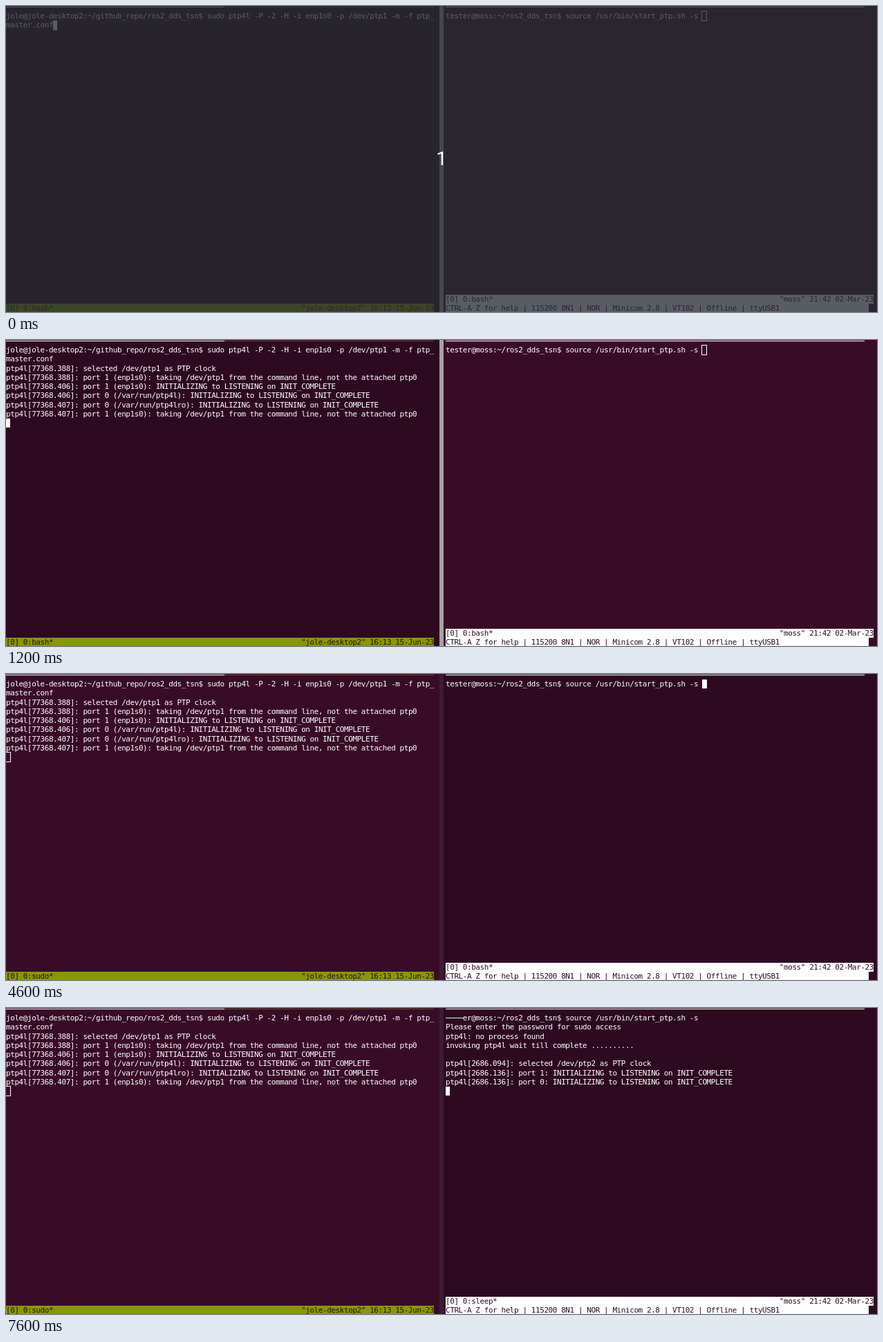
An HTML page that plays this animation: 1260x444 px, repeating every 8000 ms.

```html
<!DOCTYPE html>
<html lang="en">
<head>
<meta charset="utf-8">
<title>Clock sync in two terminals</title>
<style>
  html, body { margin: 0; width: 100%; height: 100%; overflow: hidden; background: #2d0a20; }
  #stage { position: relative; width: 1260px; height: 444px; overflow: hidden; }
  #stage div { position: absolute; box-sizing: border-box; }
  .pane { top: 0; height: 444px; background: #380c27; }
  .pane.active { background: #2d0a20; }
  #left { left: 0; width: 627px; }
  #right { left: 636px; width: 624px; }
  #divider { left: 627px; top: 0; width: 9px; height: 444px; background: #380c27; }
  #divider::before { content: ""; position: absolute; left: 0; width: 6px; height: 100%; background: #a8a0a3; }
  #divider.dark { background: #2d0a20; }
  #divider.dark::before { background: #3f1b36; }
  .text {
    font: 11px "DejaVu Sans Mono", "Noto Sans Mono", monospace;
    line-height: 13.25px; letter-spacing: -0.432px;
    font-variant-ligatures: none; white-space: pre; color: #fff;
  }
  .ink { color: #300a24; }
  .cursor { width: 8px; height: 15px; margin: -1px 0 0 -1px; border: 1px solid #fff; }
  .active .cursor { width: 6.19px; height: 13.25px; margin: 0; border: 0; background: #fff; }
  #fade { inset: 0; background: rgba(39, 45, 51, .77); }
  #count {
    left: 0; top: 206px; width: 1260px; text-align: center; color: #fff;
    font: 28px/32px Roboto, "Open Sans", sans-serif;
  }
</style>
</head>
<body>
<div id="stage">
  <div id="left" class="pane"></div>
  <div id="divider"></div>
  <div id="right" class="pane"></div>
  <div id="fade"></div>
  <div id="count">1</div>
</div>
<script>
const LOOP = 8000, CELL = 6.19, ROW = 13.25, TOP = 8;
const byId = id => document.getElementById(id);
const [left, right, divider, fade, count] = ["left", "right", "divider", "fade", "count"].map(byId);
const timed = [];

function during(el, from, to = LOOP) {
  timed.push({ el, from, to });
}

function add(pane, className, style) {
  const el = document.createElement("div");
  el.className = className;
  Object.assign(el.style, style);
  return pane.appendChild(el);
}

function bar(pane, x, y, width, height, background) {
  add(pane, "bar", { left: x + "px", top: y + "px", width: width + "px", height: height + "px", background });
}

function write(pane, row, col, text, from = 0, to = LOOP, className = "text") {
  const el = add(pane, className, { left: col * CELL + "px", top: TOP + row * ROW + "px" });
  el.textContent = text;
  during(el, from, to);
}

function ink(pane, row, col, text, from, to) {
  write(pane, row, col, text, from, to, "text ink");
}

function writeLines(pane, row, lines, from, to) {
  lines.forEach((line, i) => write(pane, row + i, 0, line, from, to));
}

// Rules left over from the line scrolled off the top
bar(left, 0, 1, 316, 1, "#fff");
bar(left, 316, 1, 303, 1, "#5f4a2a");
bar(right, 0, 1, 606, 1, "#fff");

// Left terminal
writeLines(left, 0, [
  "jole@jole-desktop2:~/github_repo/ros2_dds_tsn$ sudo ptp4l -P -2 -H -i enp1s0 -p /dev/ptp1 -m -f ptp_",
  "master.conf"
]);
writeLines(left, 2, [
  "ptp4l[77368.388]: selected /dev/ptp1 as PTP clock",
  "ptp4l[77368.388]: port 1 (enp1s0): taking /dev/ptp1 from the command line, not the attached ptp0",
  "ptp4l[77368.406]: port 1 (enp1s0): INITIALIZING to LISTENING on INIT_COMPLETE",
  "ptp4l[77368.406]: port 0 (/var/run/ptp4l): INITIALIZING to LISTENING on INIT_COMPLETE",
  "ptp4l[77368.407]: port 0 (/var/run/ptp4lro): INITIALIZING to LISTENING on INIT_COMPLETE",
  "ptp4l[77368.407]: port 1 (enp1s0): taking /dev/ptp1 from the command line, not the attached ptp0"
], 1200);
bar(left, 0, 432, 619, 12, "#869900");
ink(left, 32, 0, "[0] 0:bash*", 0, 2500);
ink(left, 32, 0, "[0] 0:sudo*", 2500);
ink(left, 32, 69, '"jole-desktop2" 16:13 15-Jun-23');

// Right terminal
const command = "er@moss:~/ros2_dds_tsn$ source /usr/bin/start_ptp.sh -s";
write(right, 0, 0, "test" + command, 0, 6400);
write(right, 0, 0, "────" + command, 6400);
write(right, 1, 0, "Please enter the password for sudo access", 5900);
writeLines(right, 2, [
  "ptp4l: no process found",
  "invoking ptp4l wait till complete .........."
], 6400);
writeLines(right, 5, [
  "ptp4l[2686.094]: selected /dev/ptp2 as PTP clock",
  "ptp4l[2686.136]: port 1: INITIALIZING to LISTENING on INIT_COMPLETE",
  "ptp4l[2686.136]: port 0: INITIALIZING to LISTENING on INIT_COMPLETE"
], 6500);
bar(right, 0, 419, 619, 13, "#fff");
bar(right, 0, 432, 612, 12, "#fff");
ink(right, 31, 0, "[0] 0:bash*", 0, 6400);
ink(right, 31, 0, "[0] 0:sudo*", 6400, 7500);
ink(right, 31, 0, "[0] 0:sleep*", 7500);
ink(right, 31, 78, '"moss" 21:42 02-Mar-23');
ink(right, 32, 0, "CTRL-A Z for help | 115200 8N1 | NOR | Minicom 2.8 | VT102 | Offline | ttyUSB1");

during(fade, 0, 100);
during(count, 0, 100);

// Cursor stops: start time, row, column
const leftStops = [[0, 1, 11], [1200, 8, 0]];
const rightStops = [[0, 0, 60], [5900, 2, 0], [6400, 4, 0], [6500, 8, 0]];
const leftCursor = add(left, "cursor", {});
const rightCursor = add(right, "cursor", {});

function place(cursor, stops, t) {
  const [, row, col] = stops.filter(stop => stop[0] <= t).pop();
  cursor.style.left = col * CELL + "px";
  cursor.style.top = TOP + row * ROW + "px";
}

// Fresh output at 6500 keeps the cursor lit through that blink
function blinkOff(t) {
  const phase = t % 1000;
  return phase >= 500 && phase < 600 && !(t >= 6500 && t < 6600);
}

function draw(t) {
  for (const { el, from, to } of timed) {
    el.style.visibility = t >= from && t < to ? "visible" : "hidden";
  }
  left.classList.toggle("active", t < 3000);
  right.classList.toggle("active", t >= 3000);
  divider.classList.toggle("dark", t >= 3000);
  place(leftCursor, leftStops, t);
  place(rightCursor, rightStops, t);
  rightCursor.style.visibility = blinkOff(t) ? "hidden" : "visible";
}

const start = performance.now();
function tick() {
  draw((performance.now() - start) % LOOP);
  requestAnimationFrame(tick);
}
tick();
</script>
</body>
</html>
```
